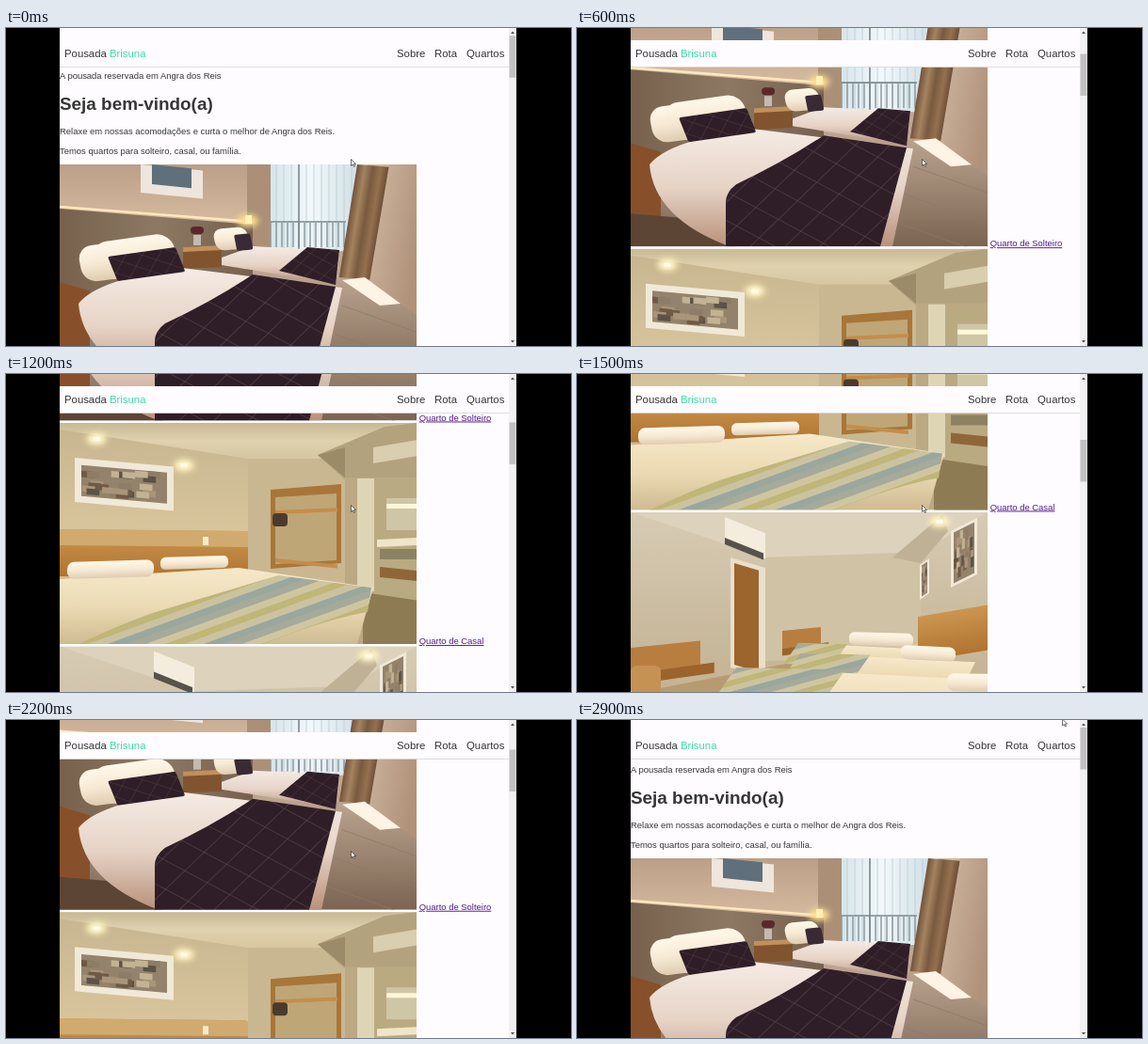
Recreate the animation shown at these times as an HTML page. Size 600 px wide and 338 px high, loop 3 s.

```html
<!DOCTYPE html>
<html lang="pt-BR">
<head>
<meta charset="utf-8">
<title>Pousada Brisuna</title>
<style>
html, body { margin: 0; width: 100%; height: 100%; overflow: hidden; background: #000; }
svg { display: block; }
body > svg { width: 600px; height: 338px; }
text { font: 9.45px "Liberation Sans", Arial, sans-serif; fill: #363636; }
.nav { font-size: 11.35px; }
.title { font-size: 18.9px; font-weight: bold; }
.link { fill: #551a8b; text-decoration: underline; }
.brand { fill: #3ddba8; }
</style>
</head>
<body>
<svg viewBox="0 0 600 338">
  <defs id="defs"></defs>
  <rect x="57" width="485" height="338" fill="#fefcfe"/>
  <g id="page">
    <text x="57" y="56">A pousada reservada em Angra dos Reis</text>
    <text x="57" y="89" class="title">Seja bem-vindo(a)</text>
    <text x="57" y="115">Relaxe em nossas acomodações e curta o melhor de Angra dos Reis.</text>
    <text x="57" y="135.5">Temos quartos para solteiro, casal, ou família.</text>
    <g id="rooms"></g>
  </g>
  <rect x="57" y="13" width="477" height="28.5" fill="#fefcfe"/>
  <path d="M57 41.5H534" stroke="#d6d6d6" stroke-width=".8"/>
  <text x="62" y="31" class="nav">Pousada</text>
  <text x="110" y="31" class="nav brand">Brisuna</text>
  <text x="415" y="31" class="nav">Sobre</text>
  <text x="455" y="31" class="nav">Rota</text>
  <text x="489" y="31" class="nav">Quartos</text>
  <rect x="534" width="8" height="338" fill="#f1f1f1"/>
  <rect id="thumb" x="534.5" width="7" height="44.5" fill="#c1c1c1"/>
  <path d="M536 6L538 3.5L540 6ZM536 332L538 334.5L540 332Z" fill="#505050"/>
  <path id="cursor" d="M0 0V7L1.7 5.5L2.8 8L4 7.5L2.9 5.1H5Z" fill="#fff" stroke="#333" stroke-width=".7"/>
</svg>
<script>
const LOOP = 3000, STEP = 100;
const PHOTO = { x: 57, y: 147, width: 379, height: 235, pitch: 237.5 };
const $ = id => document.getElementById(id);
const repeat = (n, draw) => Array.from({ length: n }, (_, i) => draw(i)).join('');

function randomFrom(seed) {
  return () => (seed = seed * 16807 % 2147483647) / 2147483647;
}

// A rectangle seen in perspective: slope tilts its top, lean tilts its sides.
const panel = (x, y, w, h, fill, slope = 0, lean = 0, round = 0) =>
  `<rect width="${w}" height="${h}" rx="${round}" fill="${fill}" transform="matrix(1 ${slope} ${lean} 1 ${x} ${y})"/>`;
const backdrop = fill => panel(0, 0, PHOTO.width, PHOTO.height, fill);
const pillow = (x, y, w, h, slope = 0, lean = 0) => panel(x, y, w, h, 'url(#pillow)', slope, lean, h * .4);
const shape = (d, fill) => `<path d="M${d}Z" fill="${fill}"/>`;
const line = (d, color, width = 1) => `<path d="M${d}" fill="none" stroke="${color}" stroke-width="${width}"/>`;
const glow = (x, y, r, color) => `<ellipse cx="${x}" cy="${y}" rx="${r}" ry="${r * .6}" fill="${color}" filter="url(#soft)"/>`;
const ceilingLight = (x, y) => glow(x, y, 11, '#fff2bb') + glow(x, y, 4, '#fff') + panel(x - 4, y - 2, 8, 4, '#fffbe4', 0, 0, 2);

function picture(x, y, w, h, slope, border, seed) {
  const random = randomFrom(seed);
  const tones = ['#6e5a45', '#a8957a', '#8d7d68', '#c2b394', '#5c5345'];
  const iw = w - border * 2, ih = h - border * 2;
  return panel(x, y, w, h, '#f1e9d8', slope) +
    panel(x + border, y + border * (1 + slope), iw, ih, '#94836c', slope) +
    repeat(24, i => {
      const dx = random() * iw * .85, dy = random() * ih * .8;
      return panel(x + border + dx, y + border + dy + slope * (border + dx), iw * .15, ih * .2, tones[i % tones.length], slope);
    });
}

function gradient(id, colors, angle = 90) {
  const stops = colors.map((c, i) => `<stop offset="${i / (colors.length - 1)}" stop-color="${c}"/>`).join('');
  return `<linearGradient id="${id}" gradientTransform="rotate(${angle} .5 .5)">${stops}</linearGradient>`;
}

function pattern(id, size, transform, content) {
  return `<pattern id="${id}" width="${size}" height="${size}" patternUnits="userSpaceOnUse" patternTransform="${transform}">${content}</pattern>`;
}

function stitch(id, gap, width) {
  return pattern(id, gap, 'rotate(28) skewX(-18)',
    panel(0, 0, gap, gap, '#2f1e27') + line(`0 0H${gap}M0 0V${gap}`, '#705a60', width));
}

function stripes(id, angle) {
  const colors = ['#a6aa9a', '#cfc6a0', '#bfb677', '#cbc39f', '#9aa79f'];
  const band = 7, size = band * colors.length;
  return pattern(id, size, `rotate(${angle})`, colors.map((c, i) => panel(0, i * band, size, band, c)).join(''));
}

$('defs').innerHTML =
  '<filter id="soft" x="-60%" y="-60%" width="220%" height="220%"><feGaussianBlur stdDeviation="3"/></filter>' +
  gradient('warmWall', ['#bb9f88', '#d2b79c', '#f3d8b4']) +
  gradient('greyBoard', ['#77614c', '#8d7963', '#75614f'], 0) +
  gradient('whiteSheet', ['#f5ebe4', '#e6d3c6', '#b8917a']) +
  gradient('pillow', ['#fff8e9', '#f7ead5', '#dfccb0']) +
  gradient('drape', ['#71533b', '#a5835f', '#795a3f', '#94714f', '#684b34'], 0) +
  gradient('sideWall', ['#cbb39c', '#b0917a'], 30) +
  gradient('tiles', ['#d2b89c', '#bba490', '#7b6552']) +
  gradient('glass', ['#cbdde4', '#f2f8fa', '#c9dbe1'], 0) +
  gradient('ceiling', ['#c8b894', '#e0d2af', '#d6c6a0']) +
  gradient('creamWall', ['#c6b590', '#d8c59c', '#c3ab80']) +
  gradient('wood', ['#cb9550', '#b0742f']) +
  gradient('creamSheet', ['#f6e9c9', '#ebdab4', '#cfbb92']) +
  gradient('plainWall', ['#d7cbb4', '#cabb9f', '#c1ad8b']) +
  stitch('throw', 27, .8) + stitch('smallThrow', 14, .5) + stripes('runner', -20);

function singleRoom() {
  const nearBed =
    panel(0, 125, 32, 80, '#87502a', .3) +
    shape('0 200L60 205L110 235H0', '#5c4534') +
    shape('20 148Q40 122 130 110L300 131L278 235H105Q25 205 20 148', 'url(#whiteSheet)') +
    pillow(18, 88, 92, 38, -.13, .2) + pillow(33, 84, 84, 40, -.14, .3) +
    panel(51, 98, 72, 26, 'url(#smallThrow)', -.14, .4, 2) +
    shape('205 117L293 130L265 235H101V190Q100 178 112 169Q163 145 205 117', 'url(#throw)');
  const farBed =
    shape('172 99L205 87L297 92L294 127L172 107', 'url(#whiteSheet)') +
    pillow(162, 69, 36, 23, -.08, .2) + panel(185, 75, 17, 17, '#392a35', -.1, .2, 2) +
    shape('263 88L297 91L293 128L233 113', 'url(#smallThrow)');
  const window =
    panel(207, 0, 120, 92, 'url(#glass)') +
    repeat(12, i => line(`${222 + i * 8} 0V90`, '#b9ccd2', .8)) +
    repeat(14, i => line(`${224 + i * 6} 62V88`, '#8b9aa0', 1.5)) +
    line('254 0V90M221 61H304', '#7b8a8f', 1.6) +
    panel(199, 0, 25, 88, '#ab9077') +
    panel(316, 0, 34, 120, 'url(#drape)', .08, -.16);
  const nightstand =
    panel(131, 88, 41, 23, '#81542f', -.05) + panel(131, 88, 41, 5, '#c2905d', -.05) +
    panel(142, 75, 8, 11, '#c4b9ae') + panel(139, 66, 14, 8, '#5d2729', 0, 0, 4);
  return backdrop('url(#tiles)') +
    panel(0, 0, 207, 110, 'url(#warmWall)') +
    panel(86, 0, 66, 30, '#eee5dc', .1) + panel(98, 0, 42, 21, '#5f6f7c', .1) +
    window +
    shape('350 0H379V160L329 124', 'url(#sideWall)') +
    shape('300 123L324 120L362 148L340 150', '#fff3e4') +
    repeat(3, i => line(`${300 - i * 8} ${150 + i * 30}l90 32`, '#8e7867', .7)) +
    panel(0, 47, 205, 110, 'url(#greyBoard)', .083) +
    line('0 45L205 61', '#ffe9bd', 2.5) +
    glow(200, 60, 11, '#ffdf92') + panel(197, 54, 7, 9, '#fff0b6') +
    nightstand + farBed + nearBed;
}

function doubleRoom() {
  const wardrobe =
    panel(224, 71, 75, 84, '#a87638', -.08) + panel(229, 79, 65, 71, '#bfa677', -.06) +
    panel(229, 93, 66, 4, '#c58d4a', -.04) + panel(229, 144, 66, 4, '#c58d4a', .1) +
    panel(226, 96, 16, 14, '#4b3b2e', 0, 0, 4);
  const bathroom =
    panel(303, 58, 76, 177, '#bba983') + panel(316, 59, 18, 120, '#ded5b4') +
    panel(334, 64, 45, 126, '#b9aa82') +
    panel(347, 80, 32, 34, '#cfc6a5') + panel(347, 86, 32, 5, '#fff8d8') +
    panel(337, 124, 42, 8, '#efe5c8', -.05) + panel(340, 134, 39, 11, '#8c8262') +
    panel(340, 153, 39, 11, '#8f6638', .1) +
    panel(322, 180, 57, 55, '#8d7b54', .15);
  return backdrop('url(#creamWall)') +
    shape('0 0H379V38H200L0 7', 'url(#ceiling)') +
    panel(200, 38, 103, 130, '#c9b792') +
    shape('274 34L345 4L379 0V60H303', '#b3a27e') + shape('274 34L303 26V58', '#9b8b69') +
    panel(333, 26, 46, 17, '#d9ceae', -.17) +
    ceilingLight(39, 17) + ceilingLight(132, 45) +
    picture(16, 37, 105, 47, .09, 7, 17) +
    panel(0, 113, 200, 50, 'url(#wood)', .01) + panel(0, 113, 200, 17, '#d0aa6e', .01) +
    panel(152, 121, 6, 9, '#f5e9c8') +
    bathroom + wardrobe +
    shape('0 166L190 154L333 175L316 235H0', 'url(#creamSheet)') +
    pillow(8, 148, 92, 18, -.03) + pillow(107, 143, 72, 13, -.03) +
    shape('20 235Q70 212 95 203L232 162L331 175L327 201Q285 208 216 235', 'url(#runner)');
}

function familyRoom() {
  const bed = (x, y, w, h) =>
    panel(x, y, w, h, 'url(#creamSheet)', .05, -.5) + panel(x, y, w * .4, h, 'url(#runner)', .02, -.7);
  const desk = (x, y, w, h) =>
    panel(x, y, w, h, '#b87e40', -.1) + panel(x, y + h, w * 1.2, h * .4, '#9c632c', -.14);
  return backdrop('url(#plainWall)') +
    shape('0 0H379L308 42L143 48', '#ddd2bb') +
    panel(143, 48, 165, 110, '#d0c2a5', -.03) +
    shape('278 48L331 3L337 20L308 54', '#bfb195') +
    ceilingLight(328, 10) +
    panel(100, 5, 43, 27, '#f4eddd', .4) + panel(100, 27, 41, 7, '#57524a', .4) +
    panel(106, 48, 37, 117, '#e9dfca', .3) + panel(110, 54, 26, 108, '#9b652d', .3) +
    picture(340, 20, 28, 60, -.5, 3, 5) + picture(307, 56, 10, 37, -.7, 2, 9) +
    panel(305, 111, 74, 48, 'url(#wood)', -.17) +
    shape('0 193L170 160L250 145L379 183V235H0', '#b69b71') +
    desk(161, 126, 41, 19) + desk(0, 144, 74, 28) + panel(0, 163, 32, 30, '#c59254', 0, 0, 6) +
    bed(178, 139, 130, 22) + pillow(232, 127, 68, 14, .03) +
    bed(180, 150, 186, 35) + pillow(287, 141, 58, 15, .05) +
    bed(112, 165, 290, 70) + pillow(336, 171, 60, 19, .02);
}

const rooms = [
  { draw: singleRoom, label: 'Quarto de Solteiro' },
  { draw: doubleRoom, label: 'Quarto de Casal' },
  { draw: familyRoom, label: 'Quarto de Família' },
];

$('rooms').innerHTML = rooms.map(({ draw, label }, i) => {
  const { x, y, width, height, pitch } = PHOTO;
  const top = y + i * pitch;
  return `<svg x="${x}" y="${top}" width="${width}" height="${height}">${draw()}</svg>
    <text x="${x + width + 2.7}" y="${top + height}" class="link">${label}</text>`;
}).join('');

// [time in ms, scroll offset in px]
const scrollKeys = [[0, 2], [400, 106], [1000, 237.5], [1500, 475], [1900, 272.5], [2500, 88], [2700, 0], [LOOP, 0]];

function scrollAt(time) {
  const i = scrollKeys.findIndex(key => key[0] > time);
  const [t0, s0] = scrollKeys[i - 1];
  const [t1, s1] = scrollKeys[i];
  return s0 + (s1 - s0) * (time - t0) / (t1 - t0);
}

const start = performance.now();
function render() {
  const elapsed = Math.max(0, performance.now() - start) % LOOP;
  const time = Math.floor(elapsed / STEP) * STEP;
  const scroll = scrollAt(time);
  $('page').setAttribute('transform', `translate(0 ${-scroll})`);
  $('thumb').setAttribute('y', 8 + scroll * .1305);
  $('cursor').setAttribute('transform', time >= 2900 ? 'translate(515.5 -1)' : 'translate(366.5 139.5)');
  requestAnimationFrame(render);
}
render();
</script>
</body>
</html>
```
